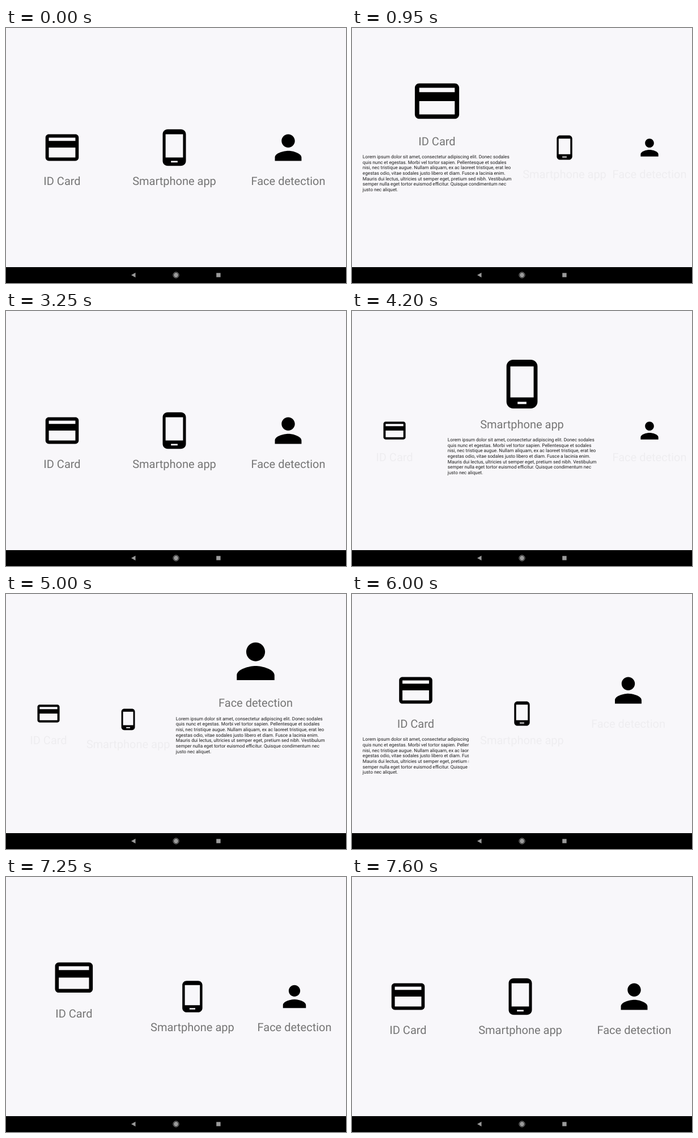
Write an HTML page that moves like this. It is 600x450 px and loops after 8000 ms.

```html
<!DOCTYPE html>
<html lang="en">
<head>
<meta charset="utf-8">
<title>Expanding columns</title>
<style>
  html, body { margin: 0; width: 100%; height: 100%; overflow: hidden; background: #f8f7fa; }
  svg { display: block; width: 100vw; height: 100vh; }
  text { font-family: Roboto, sans-serif; text-rendering: geometricPrecision; }
  .label { font-size: 20px; fill: #757575; text-anchor: middle; }
  .body { font-size: 8.24px; fill: #1c1c1c; }
</style>
</head>
<body>
<svg id="stage" viewBox="0 0 600 450">
  <rect width="600" height="450" fill="#f8f7fa"/>
  <g id="columns"></g>
  <circle id="touch" r="7" fill="#fff" fill-opacity=".55" stroke="#777" stroke-opacity=".45"/>
  <rect y="422" width="600" height="28"/>
  <g fill="#9b9b9b">
    <path d="M221 436l7.5-4.2v8.4z"/>
    <circle cx="300" cy="436" r="3.9"/>
    <circle cx="300" cy="436" r="5.2" fill="none" stroke="#9b9b9b" stroke-width=".8"/>
    <rect x="371.2" y="432.3" width="7.4" height="7.4"/>
  </g>
</svg>
<script>
const LOOP = 8000, STEP = 50, PAD = 18.8, FAINT = 0.07;
const NONE = -1, CARD = 0, PHONE = 1, FACE = 2;

const items = [
  ["ID Card", "M20 4H4c-1.11 0-1.99.89-1.99 2L2 18c0 1.11.89 2 2 2h16c1.11 0 2-.89 2-2V6c0-1.11-.89-2-2-2zm0 14H4v-6h16v6zm0-10H4V6h16v2z"],
  ["Smartphone app", "M16 1H8C6.34 1 5 2.34 5 4v16c0 1.66 1.34 3 3 3h8c1.66 0 3-1.34 3-3V4c0-1.66-1.34-3-3-3zm-2 20h-4v-1h4v1zm3.25-3H6.75V4h10.5v14z"],
  ["Face detection", "M12 12c2.21 0 4-1.79 4-4s-1.79-4-4-4-4 1.79-4 4 1.79 4 4 4zm0 2c-2.67 0-8 1.34-8 4v2h16v-2c0-2.66-5.33-4-8-4z"]
];

const lorem = [
  "Lorem ipsum dolor sit amet, consectetur adipiscing elit. Donec sodales",
  "quis nunc et egestas. Morbi vel tortor sapien. Pellentesque et sodales",
  "nisi, nec tristique augue. Nullam aliquam, ex ac laoreet tristique, erat leo",
  "egestas odio, vitae sodales justo libero et diam. Fusce a lacinia enim.",
  "Mauris dui lectus, ultricies ut semper eget, pretium sed nibh. Vestibulum",
  "semper nulla eget tortor euismod efficitur. Quisque condimentum nec",
  "justo nec aliquet."
];

// Each move runs until `end`, where it comes to rest.
const moves = [
  { start: 790, end: 950, dur: 430, to: CARD },
  { start: 2940, end: 3250, dur: 310, to: NONE },
  { start: 3740, end: 4200, dur: 430, to: PHONE },
  { start: 4796, end: 5200, dur: 404, to: FACE },
  { start: 5949, end: 6400, dur: 430, to: CARD },
  { start: 7190, end: 7600, dur: 410, to: NONE }
];

const touches = [
  { from: 450, to: 800, x: 91.5, y: 220 },
  { from: 2750, to: 2950, x: 155, y: 147 },
  { from: 4650, to: 4800, x: 525.5, y: 220 },
  { from: 5800, to: 5950, x: 88.5, y: 215.5 },
  { from: 7050, to: 7200, x: 150, y: 140 }
];

function el(tag, parent, attrs = {}) {
  const node = document.createElementNS("http://www.w3.org/2000/svg", tag);
  parent.append(node);
  return set(node, attrs);
}

function set(node, attrs) {
  for (const key in attrs) node.setAttribute(key, attrs[key]);
  return node;
}

const root = document.getElementById("columns");
const touch = document.getElementById("touch");

const columns = items.map(([name, path], i) => {
  const clip = el("clipPath", root, { id: "clip" + i });
  const window_ = el("rect", clip, { y: 0, height: 422 });
  const icon = el("path", root, { d: path });
  const label = el("text", root, { class: "label" });
  label.textContent = name;
  const frame = el("g", root, { "clip-path": `url(#clip${i})` });
  const body = el("g", frame, { class: "body" });
  lorem.forEach((line, n) => {
    el("text", body, { y: n * 9.67 }).textContent = line;
  });
  return { window_, icon, label, frame, body };
});

// Column bounds, icon and label of column i while `open` is expanded.
function layout(open, i) {
  if (open === NONE) {
    return { left: i * 198, right: i === 2 ? 600 : (i + 1) * 198, scale: 2.93, icon: 211, base: 277 };
  }
  const left = i * 150 + (open < i ? 150 : 0);
  return open === i
    ? { left, right: left + 300, scale: 3.91, icon: 129, base: 206.5 }
    : { left, right: left + 150, scale: 1.955, icon: 211, base: 265 };
}

function overshoot(t) {
  const u = t - 1;
  return u * u * (3 * u + 2) + 1;
}

function draw(time) {
  let from = NONE, to = NONE, t = 1;
  for (const move of moves) {
    if (time < move.start) break;
    from = to;
    to = move.to;
    t = time >= move.end ? 1 : Math.min(1, (time - move.start) / move.dur);
  }
  const p = overshoot(t);

  columns.forEach((col, i) => {
    const a = layout(from, i), b = layout(to, i);
    const mix = key => a[key] + (b[key] - a[key]) * p;
    const left = mix("left"), right = mix("right"), base = mix("base");
    const mid = (left + right) / 2;
    const open = to === i;

    set(col.icon, { transform: `translate(${mid} ${mix("icon")}) scale(${mix("scale")}) translate(-12 -12)` });
    set(col.label, { x: mid, y: base, opacity: open || to === NONE ? 1 : FAINT });
    set(col.frame, { display: open && t > 0.005 ? "inline" : "none" });
    set(col.window_, { x: left + PAD - 1, width: Math.max(0, right - left - 2 * PAD + 1) });
    set(col.body, { transform: `translate(${left + PAD} ${base + 23.4})` });
  });

  const tap = touches.find(d => time >= d.from && time < d.to);
  set(touch, tap ? { cx: tap.x, cy: tap.y, display: "inline" } : { display: "none" });
}

const began = performance.now();
function tick() {
  const time = (performance.now() - began) % LOOP;
  draw(Math.floor(time / STEP) * STEP);
  requestAnimationFrame(tick);
}
tick();
</script>
</body>
</html>
```
